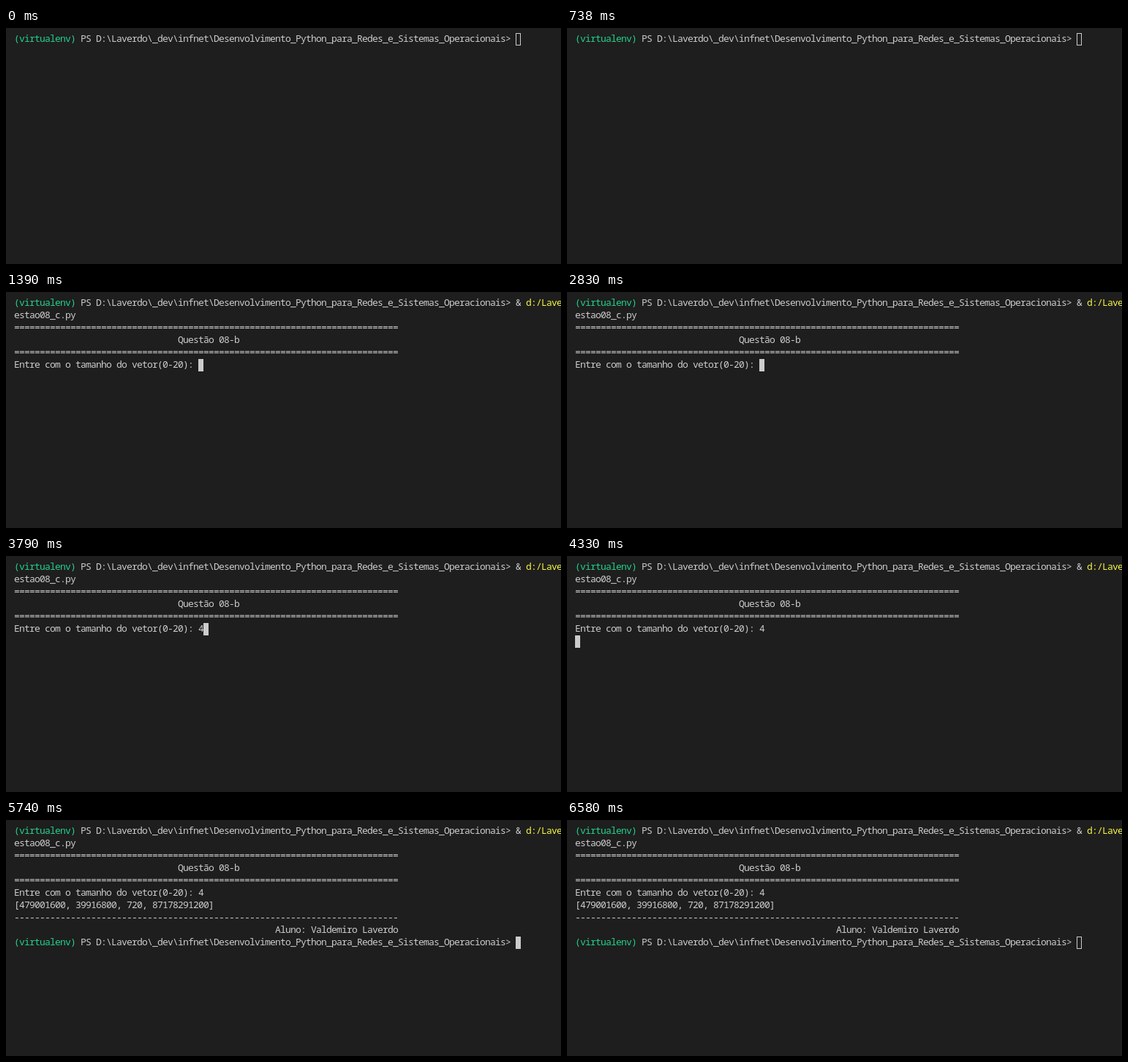
Animation of 759 by 324 pixels, one loop 6.66 s. Source, as an HTML page:

```html
<!DOCTYPE html>
<html lang="pt">
<head>
<meta charset="utf-8">
<title>Terminal</title>
<style>
  html, body { margin: 0; width: 100%; height: 100%; overflow: hidden; background: #1e1e1e; }
  svg { display: block; width: 759px; height: 324px; }
  text {
    /* 7.8px advance tightened to the 7px cell */
    font: 13px "Noto Sans Mono", "DejaVu Sans Mono", monospace;
    letter-spacing: -.8px;
    font-variant-ligatures: none;
    white-space: pre;
    fill: #ccc;
  }
  .env { fill: #23d18b; }
  .cmd { fill: #f5f543; }

  /* One loop: run 1390, digit 3790, enter 4330, result 4480 of 6660 ms */
  .run, .digit, .result, #caret { animation: 6660ms step-end infinite; }
  .run { animation-name: run; }
  .digit { animation-name: digit; }
  .result { animation-name: result; }
  #caret { animation-name: caret; stroke: #ccc; }

  @keyframes run { 0% { visibility: hidden; } 20.871%, 100% { visibility: visible; } }
  @keyframes digit { 0% { visibility: hidden; } 56.907%, 100% { visibility: visible; } }
  @keyframes result { 0% { visibility: hidden; } 67.267%, 100% { visibility: visible; } }
  @keyframes caret {
    0% { transform: translate(697px, 7px); fill: transparent; }
    18.468% { transform: translate(697px, 7px); fill: #ccc; }
    20.871% { transform: translate(263px, 92px); fill: #ccc; }
    56.907% { transform: translate(270px, 92px); fill: #ccc; }
    65.015% { transform: translate(11px, 109px); fill: #ccc; }
    67.267% { transform: translate(697px, 160px); fill: #ccc; }
    98.799%, 100% { transform: translate(697px, 160px); fill: transparent; }
  }
</style>
</head>
<body>
<svg viewBox="0 0 759 324">
  <g id="screen"></g>
  <rect id="caret" x=".5" y=".5" width="6" height="16"/>
</svg>
<script>
  const CELL = 7, LINE = 17, LEFT = 11, BASE = 19;
  const screen = document.getElementById('screen');

  function put(row, col, str, cls = '') {
    const t = document.createElementNS('http://www.w3.org/2000/svg', 'text');
    t.setAttribute('x', LEFT + col * CELL);
    t.setAttribute('y', BASE + row * LINE);
    t.setAttribute('class', cls);
    t.textContent = str;
    screen.append(t);
  }

  function prompt(row, cls = '') {
    put(row, 0, '(virtualenv)', 'env ' + cls);
    put(row, 13, 'PS D:\\Laverdo\\_dev\\infnet\\Desenvolvimento_Python_para_Redes_e_Sistemas_Operacionais>', cls);
  }

  prompt(0);
  put(0, 98, '&', 'run');
  put(0, 100, 'd:/Lave', 'run cmd');
  put(1, 0, 'estao08_c.py', 'run');
  put(2, 0, '='.repeat(75), 'run');
  put(3, 32, 'Questão 08-b', 'run');
  put(4, 0, '='.repeat(75), 'run');
  put(5, 0, 'Entre com o tamanho do vetor(0-20):', 'run');
  put(5, 36, '4', 'digit');
  put(6, 0, '[479001600, 39916800, 720, 87178291200]', 'result');
  put(7, 0, '-'.repeat(75), 'result');
  put(8, 51, 'Aluno: Valdemiro Laverdo', 'result');
  prompt(9, 'result');
</script>
</body>
</html>
```
